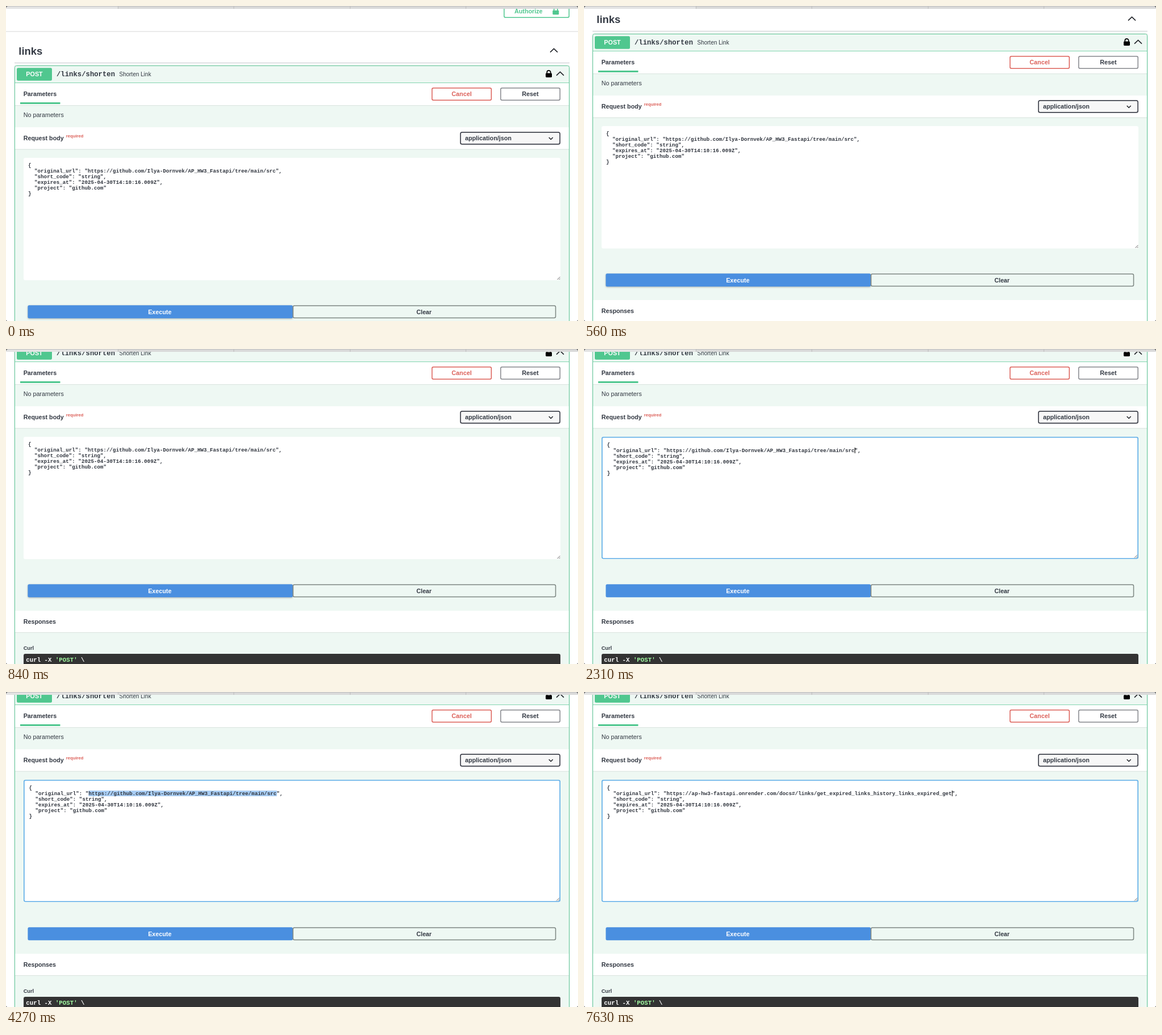
An HTML page for the animation above (8000 ms loop, 1008 by 556 pixels).

```html
<!DOCTYPE html>
<html lang="en">
<head>
<meta charset="utf-8">
<title>API docs</title>
<style>
  html, body { margin: 0; width: 100%; height: 100%; overflow: hidden; background: #fff; }
  svg { display: block; width: 1008px; height: 556px; }
  text { font-family: "Liberation Sans", Arial, sans-serif; font-size: 10.75px; fill: #333943; white-space: pre; }
  .bold { font-weight: 700; }
  .mid { text-anchor: middle; }
  .mono { font-family: "Liberation Mono", "Courier New", monospace; font-weight: 700; }
  .json { font-size: 9.216px; fill: #30353e; }
  .chevron { fill: none; stroke: #1c1f24; stroke-width: 1.5; }
  .glow { filter: drop-shadow(0 1px 1.5px rgba(0, 0, 0, .28)); }
</style>
</head>
<body>
<svg viewBox="0 0 1008 556">
  <g id="page"></g>
  <g id="chrome"></g>
</svg>
<script>
const DURATION = 8000;
const CHAR = 9.216 * 0.6;
const LINE = 10;
const URL_COL = 19;
const GREEN = '#50c78f', RED = '#dc6059', TINT = '#eef8f3';
const OLD_URL = 'https://github.com/Ilya-Dornvek/AP_HW3_Fastapi/tree/main/src';
const NEW_URL = 'https://ap-hw3-fastapi.onrender.com/docs#/links/get_expired_links_history_links_expired_get';

// Tables of [time, value]; a value holds until the next time.
const SCROLL = [[0, 0], [490, 18.5], [560, 56], [630, 90], [700, 103], [770, 110], [840, 113]];
const SELECTED = [[0, 0], [2940, 3], [3010, 9], [3080, 19], [3150, 30], [3220, 41], [3290, 50],
  [3360, 56], [3430, 59], [3500, 60], [3850, 79], [3920, 60], [4130, 56], [4270, 60], [5460, 0]];
const CARET = [[0, 0], [2240, 1], [2940, 0], [5460, 1], [6020, .5], [6090, 0],
  [6370, .33], [6440, .67], [6510, 1], [7070, .67], [7140, .33], [7210, 0],
  [7490, .33], [7560, .67], [7630, 1]];
const FOCUS_AT = 2240, GLOW_END = 2310, PASTE_AT = 5460;

const page = document.getElementById('page');
const chrome = document.getElementById('chrome');

function add(parent, tag, attrs, content) {
  const el = document.createElementNS('http://www.w3.org/2000/svg', tag);
  for (const key in attrs) el.setAttribute(key, attrs[key]);
  if (content !== undefined) el.textContent = content;
  return parent.appendChild(el);
}
const rect = (x, y, width, height, fill, more, parent = page) =>
  add(parent, 'rect', { x, y, width, height, fill, ...more });
const label = (x, y, str, cls = 'bold', style = '') =>
  add(page, 'text', { x, y, class: cls, style }, str);
const path = (d, attrs) => add(page, 'path', { d, ...attrs });

function outline(x, y, w, h, stroke, fill = 'none', line = 1.5, rx = 2.5) {
  const half = line / 2;
  return rect(x + half, y + half, w - line, h - line, fill, { stroke, 'stroke-width': line, rx });
}
function button(x, y, w, str, stroke, color, fill) {
  outline(x, y, w, 23, stroke, fill);
  label(x + w / 2, y + 15.4, str, 'bold mid', `fill:${color}`);
}
function padlock(x, y, color) {
  rect(x, y + 6, 11, 7.5, color, { rx: 1.4 });
  path(`M${x + 2.3} ${y + 7}v-2.4a3.2 3.2 0 0 1 6.4 0v2.4`,
    { fill: 'none', stroke: color, 'stroke-width': 1.7 });
}
const chevronUp = (x, y) => path(`M${x} ${y + 6.6}l6.5 -6.2l6.5 6.2`, { class: 'chevron' });

function section(y, h) {
  rect(15.5, y, 977, h, '#fff');
  rect(15.5, y + h, 977, 1, '#d9e3de');
}

// Page header
button(877, -2, 116, '', GREEN, GREEN, '#fff');
label(896, 13.1, 'Authorize', 'bold', `fill:${GREEN}`);
padlock(963.3, 1.8, GREEN);
rect(0, 44.5, 1008, 1, '#d8d8d8');
label(22.3, 86.2, 'links', 'bold', 'font-size:18.4px');
chevronUp(959, 75);
rect(15, 100, 978, 1, '#c5c7cb');

// Operation block
rect(15, 105, 978, 720, TINT, { rx: 3, style: 'filter:drop-shadow(0 0 1.2px rgba(0,0,0,.2))' });
rect(15, 135.2, 978, 1, '#6fd0a3');
rect(19, 109.3, 62, 22.4, GREEN, { rx: 2.3 });
label(50, 124.3, 'POST', 'bold mid', 'fill:#fff');
label(89, 124.3, '/links/shorten', 'mono', 'font-size:12.288px');
label(199.5, 124, 'Shorten Link', '', 'font-size:10px');
padlock(951, 112.5, '#000');
chevronUp(970, 116);

section(136.2, 39);
label(30.7, 159.4, 'Parameters');
rect(25, 170, 70.5, 3.1, GREEN);
button(750, 144, 106, 'Cancel', RED, RED, '#fff');
button(871, 144, 106, 'Reset', '#85878c', '#333943', '#fff');
label(30.7, 196.3, 'No parameters', '');

section(214, 38.6);
label(30.7, 237.3, 'Request body');
label(105.8, 232.4, 'required', 'bold', `font-size:7.68px;fill:${RED}`);
outline(800, 222, 177, 22.8, '#41444e', '#f7f7f7', 1.7, 3);
label(809, 237.2, 'application/json');
path('M956.7 232l3.5 3.5l3.5 -3.5', { class: 'chevron', 'stroke-width': 1.4 });

// Request editor
rect(31, 268, 946, 216, '#fff', { rx: 3 });
const ring = outline(31, 268, 946, 215.5, '#5aabe6', '#fff', 1.6, 2.5);
const editor = add(page, 'g', {});
const [topSel, urlSel] = [0, 1].map(i =>
  rect(39, 275.5 + i * LINE, 0, LINE, '#a9cef5', {}, editor));
const lines = ['{', '', '  "short_code": "string",',
  '  "expires_at": "2025-04-30T14:10:16.009Z",', '  "project": "github.com"', '}']
  .map((str, i) => add(editor, 'text',
    { x: 39, y: 283.5 + i * LINE, class: 'mono json' }, str));
const caret = rect(0, 285.5, 1.1, LINE, '#111', {}, editor);
const grip = path('M971.5 483l5 -5M974.5 483l2 -2', { stroke: '#555', 'stroke-width': .9 });

// Execute row
const execute = rect(38.4, 528.3, 467, 23, '#4a8fe0', { rx: 2.5 });
label(271, 543.6, 'Execute', 'bold mid', 'fill:#fff');
outline(505, 528.3, 464.3, 23, '#7d8682');
label(736.6, 543.6, 'Clear', 'bold mid');

// Responses
section(575, 38);
label(30.7, 597.7, 'Responses');
label(30.7, 644.3, 'Curl', 'bold', 'font-size:9.2px');
rect(31, 651, 946, 120, '#333', { rx: 3 });
const curl = label(35.3, 664.6, '', 'mono', 'fill:#fff');
add(curl, 'tspan', {}, 'curl -X ');
add(curl, 'tspan', { fill: '#a2fca2' }, "'POST'");
add(curl, 'tspan', {}, ' \\');
outline(15, 105, 978, 720, '#62cc9b', 'none', 1, 3);

// Browser tab strip
rect(0, 0, 1008, 5, '#d9d9d9', {}, chrome);
rect(0, 0, 197, 5, '#e3e3e3', {}, chrome);
rect(0, 0, 1008, .8, '#b9b9b9', {}, chrome);
for (const x of [197, 401, 606, 810]) rect(x, 0, 1, 5, '#bdbdbd', {}, chrome);
add(chrome, 'path', { d: 'M0 0h3l-3 3zM1008 0h-3l3 3zM0 556h2l-2 -2zM1008 556h-2l2 -2z', fill: '#777' });

function at(table, t) {
  let value = table[0][1];
  for (const [time, v] of table) if (t >= time) value = v;
  return value;
}

function render(t) {
  const focused = t >= FOCUS_AT;
  const url = t >= PASTE_AT ? NEW_URL : OLD_URL;
  const endCol = URL_COL + url.length;
  const selected = at(SELECTED, t);

  page.setAttribute('transform', `translate(0 ${-at(SCROLL, t)})`);
  ring.style.opacity = focused ? 1 : 0;
  editor.setAttribute('transform', focused ? 'translate(1.5 1.5)' : '');
  grip.setAttribute('transform', focused ? 'translate(-1.5 -1.5)' : '');
  execute.setAttribute('class', t < GLOW_END ? 'glow' : '');
  lines[1].textContent = `  "original_url": "${url}",`;

  urlSel.setAttribute('x', 39 + (endCol - selected) * CHAR);
  urlSel.setAttribute('width', selected * CHAR);
  topSel.setAttribute('width', selected === endCol ? 928.5 : 0);
  caret.setAttribute('x', 38.6 + endCol * CHAR);
  caret.style.opacity = at(CARET, t);
}

const start = performance.now();
function tick() {
  render((performance.now() - start) % DURATION);
  requestAnimationFrame(tick);
}
tick();
</script>
</body>
</html>
```
